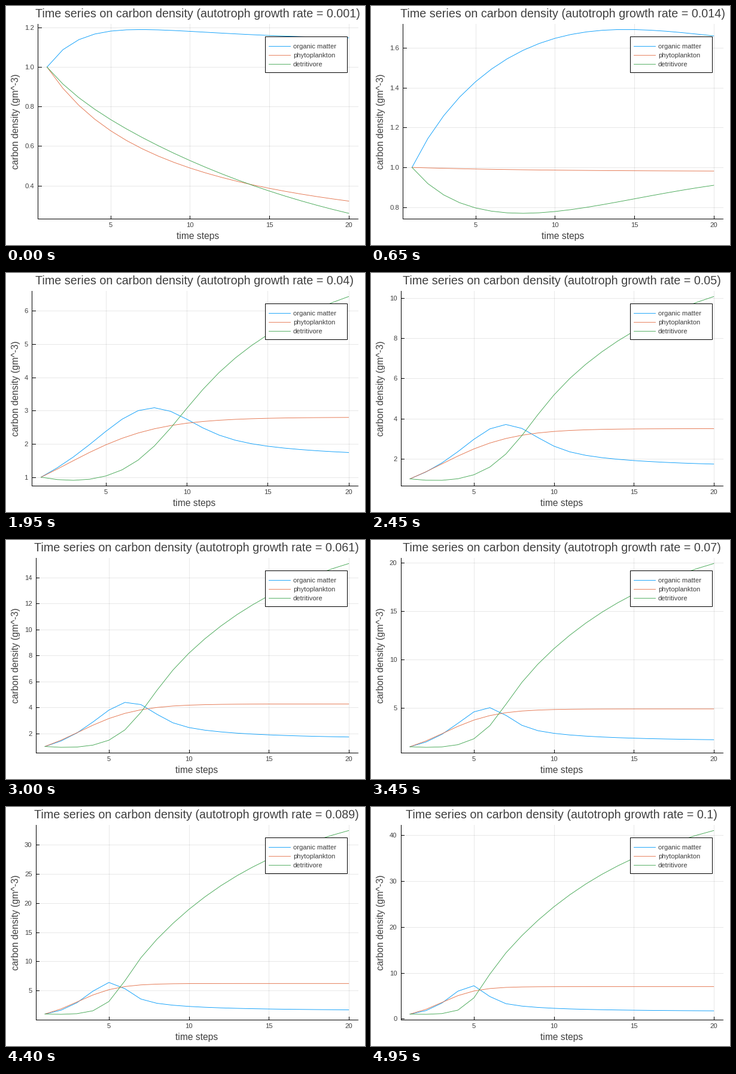
Recreate the animation shown at these times as a matplotlib script. Size 600x400 px, loop 5 s.

```python
import math

import matplotlib.pyplot as plt
import numpy as np
from matplotlib.animation import FuncAnimation
from matplotlib.patches import Rectangle

plt.rcParams["font.family"] = "Liberation Sans"

W, H, DPI = 600, 400, 100
FRAMES, INTERVAL = 100, 50
TOP, BOTTOM, RIGHT = 30.2, 356.2, 588.0
LEFT_BY_LABEL = {1: 43.2, 2: 49.9, 3: 53.4, 4: 59.9}
INK = "#404040"
SERIES = [
    ("organic matter", "#009afa"),
    ("phytoplankton", "#e36f47"),
    ("detritivore", "#3ea44e"),
]
STEPS = np.arange(1, 21)
RATES = np.arange(1, FRAMES + 1) / 1000


def flow(state):
    """Carbon flow between organic matter, phytoplankton and detritivores."""
    o, p, d = state
    death = 0.13 * p * p
    growth = 13 * RATES * p
    return np.array([
        death + 0.3 * growth + 0.2622 * d - 0.2822 * o * d,
        0.7 * growth - death,
        0.167 * o * d - 0.2647 * d,
    ])


def simulate(substeps=40):
    state = np.ones((3, FRAMES))
    h = 1 / substeps
    history = [state]
    for _ in STEPS[1:]:
        for _ in range(substeps):
            k1 = flow(state)
            k2 = flow(state + h / 2 * k1)
            k3 = flow(state + h / 2 * k2)
            k4 = flow(state + h * k3)
            state = state + h / 6 * (k1 + 2 * k2 + 2 * k3 + k4)
        history.append(state)
    return np.array(history)  # step, series, rate


def padded(values):
    lo, hi = np.min(values), np.max(values)
    pad = 0.03 * (hi - lo)
    return lo - pad, hi + pad


def choose_ticks(lo, hi):
    """Score round tick steps by count, coverage and niceness."""
    span = hi - lo
    best, result = -math.inf, None
    for z in range(-2, 3):
        for q, nice in ((1, 1), (5, 0.9), (2, 0.7), (2.5, 0.5), (3, 0.2)):
            step = q * 10.0 ** z
            first, last = math.ceil(lo / step), math.floor(hi / step)
            n = last - first + 1
            if not 4 <= n <= 8:
                continue
            reach = math.ceil(hi / step)
            zero = reach <= 15 and reach * step < 2 * span
            score = ((1 - abs(n - 5) / 5) / 4 + zero / 6
                     + 0.5 * span / ((n - 1) * step) + nice / 4)
            if score > best:
                digits = max(0, -z) + (q == 2.5 and z < 1)
                best = score
                result = [i * step for i in range(first, last + 1)], digits
    ticks, digits = result
    if digits == 2:
        ticks = [min(t, 2.0) for t in ticks]  # the top tick doubles up
    return ticks, digits


def text(x, y, s, px, ha="center", **kw):
    ax.text(x, y, s, fontsize=px * 72 / DPI, color=INK, ha=ha,
            va="baseline", **kw)


def line(xs, ys, color="black", px=1.0, **kw):
    ax.plot(xs, ys, color=color, lw=px * 72 / DPI, **kw)


def legend():
    ax.add_patch(Rectangle((433, 51.2), 137, 60, fc="white", ec="black",
                           lw=0.72, zorder=5))
    for i, (name, color) in enumerate(SERIES):
        y = 67 + 15 * i
        line([439, 475], [y, y], color, 0.85, zorder=6)
        text(480, y + 4, name, 11.3, "left", zorder=6)


def draw(i):
    ax.clear()
    ax.set(xlim=(0, W), ylim=(H, 0))
    ax.axis("off")

    data = DATA[:, :, i]
    x_lo, x_hi = padded(STEPS)
    y_lo, y_hi = padded(data)
    ticks, digits = choose_ticks(y_lo, y_hi)
    labels = [f"{t:.{digits}f}" for t in ticks]
    left = LEFT_BY_LABEL[max(map(len, labels))]
    mid = (left + RIGHT) / 2

    def px(x):
        return left + (x - x_lo) / (x_hi - x_lo) * (RIGHT - left)

    def py(y):
        return BOTTOM - (y - y_lo) / (y_hi - y_lo) * (BOTTOM - TOP)

    for t in (5, 10, 15, 20):
        x = px(t)
        line([x, x], [TOP, BOTTOM], alpha=0.09, zorder=1)
        line([x, x], [BOTTOM - 5.5, BOTTOM], zorder=3)
        text(x, 370, str(t), 11.3)
    for t, label in zip(ticks, labels):
        y = py(t)
        line([left, RIGHT], [y, y], alpha=0.09, zorder=1)
        line([left, left + 5.5], [y, y], zorder=3)
        text(left - 6.3, y + 4, label, 11.3, "right")
    line([left, left], [TOP, BOTTOM], zorder=3)
    line([left, RIGHT], [BOTTOM, BOTTOM], zorder=3)

    for k, (_, color) in enumerate(SERIES):
        line(px(STEPS), py(data[:, k]), color, 0.88, zorder=4)
    legend()

    rate = f"{RATES[i]:g}"
    text(mid - 0.3, 19,
         f"Time series on carbon density (autotroph growth rate = {rate})",
         19.75)
    text(mid - 0.5, 390, "time steps", 15.6)
    text(21, 193, "carbon density (gm^-3)", 15.6, rotation=90,
         rotation_mode="anchor")


DATA = simulate()
fig = plt.figure(figsize=(W / DPI, H / DPI), dpi=DPI, facecolor="white")
ax = fig.add_axes([0, 0, 1, 1])
anim = FuncAnimation(fig, draw, frames=FRAMES, interval=INTERVAL,
                     init_func=lambda: None, repeat=True, repeat_delay=0)
plt.show()
```
